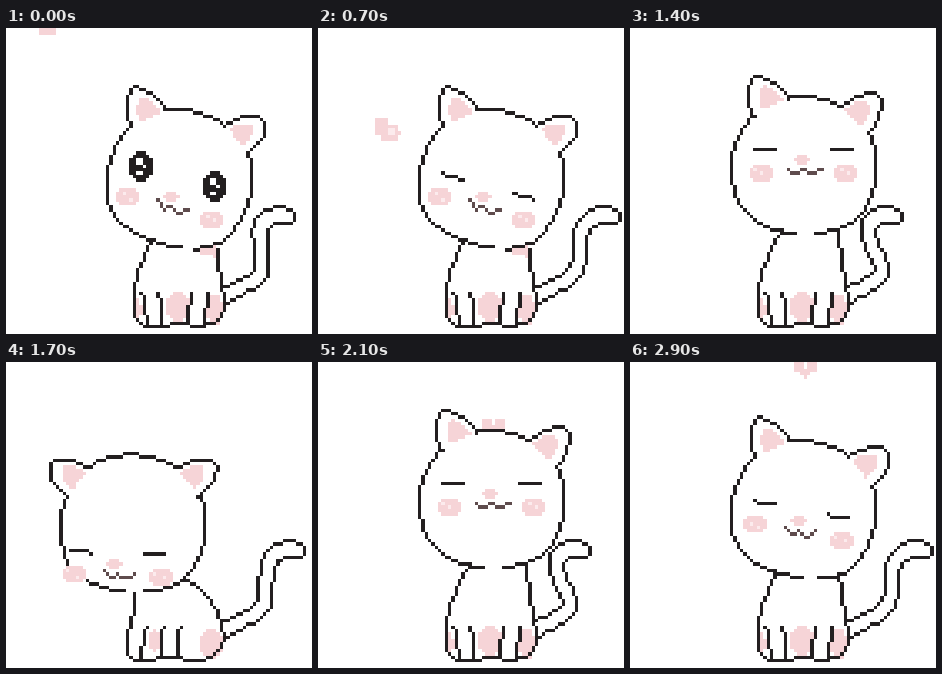
An HTML page with a canvas for the animation above (3000 ms loop, 306 px wide and 306 px high).

```html
<!DOCTYPE html>
<html>
<head>
<meta charset="utf-8">
<style>
html, body { margin: 0; width: 100%; height: 100%; overflow: hidden; background: #fff; }
canvas { display: block; width: 306.667px; height: 306.667px; image-rendering: pixelated; }
</style>
</head>
<body>
<canvas id="stage" width="92" height="92"></canvas>
<script>
const ctx = document.getElementById('stage').getContext('2d');
const INK = '#231f20', PINK = '#f6d4d7', WHITE = '#fff', BROWN = '#5f4c4d', PALE = '#fcebed';
const LOOP = 3000, STEP = 100, TURN = 2 * Math.PI;

// Points are [x, y] in stage units, drawn on a grid of 10/3 unit cells
const cell = v => Math.floor(v * 0.3);
const middle = v => (cell(v) + 0.5) / 0.3;
const range = (n, make) => Array.from({ length: n + 1 }, (_, i) => make(i / n));
const mix = (a, b, k) => a.map((v, i) => v + (b[i] - v) * k);

function dot(x, y, color, w = 1, h = w) {
  ctx.fillStyle = color;
  ctx.fillRect(cell(x), cell(y), w, h);
}

// Smooth curve through points (Catmull-Rom)
function curve(p) {
  return p.slice(1).flatMap((b, i) => {
    const a = p[i], before = p[i - 1] || a, after = p[i + 2] || b;
    return range(10, t => [0, 1].map(n => a[n] + t / 2 * (b[n] - before[n]
      + t * (2 * before[n] - 5 * a[n] + 4 * b[n] - after[n]
      + t * (3 * (a[n] - b[n]) + after[n] - before[n])))));
  });
}

// One cell wide line without doubled corners
function line(p, color = INK) {
  const cells = [];
  p.slice(1).forEach((b, i) => {
    const a = p[i], n = Math.ceil(Math.hypot(b[0] - a[0], b[1] - a[1])) || 1;
    for (const q of range(n, t => mix(a, b, t).map(cell))) {
      const last = cells.at(-1), prior = cells.at(-2);
      if (last && last[0] === q[0] && last[1] === q[1]) continue;
      if (prior && Math.abs(prior[0] - q[0]) === 1 && Math.abs(prior[1] - q[1]) === 1) cells.pop();
      cells.push(q);
    }
  });
  ctx.fillStyle = color;
  for (const [x, y] of cells) ctx.fillRect(x, y, 1, 1);
}

function fill(p, color) {
  ctx.fillStyle = color;
  for (let row = 0; row < 92; row++) {
    const y = (row + 0.5) / 0.3, hits = [];
    p.forEach(([ax, ay], i) => {
      const [bx, by] = p[(i + 1) % p.length];
      if (ay > y !== by > y) hits.push(ax + (y - ay) * (bx - ax) / (by - ay));
    });
    hits.sort((a, b) => a - b);
    for (let k = 0; k + 1 < hits.length; k += 2) {
      const from = Math.round(hits[k] * 0.3);
      ctx.fillRect(from, row, Math.round(hits[k + 1] * 0.3) - from, 1);
    }
  }
}

function oval(x, y, rx, ry, color) {
  fill(range(24, t => [middle(x) + rx * Math.cos(t * TURN), middle(y) + ry * Math.sin(t * TURN)]), color);
}

// Maps local (right, down) to the stage from a centre and a turn in degrees
function frame(x, y, degrees) {
  const c = Math.cos(degrees * TURN / 360), s = Math.sin(degrees * TURN / 360);
  return ([u, v]) => [x + u * c - v * s, y + u * s + v * c];
}

function at(keys, t) {
  const i = Math.max(0, keys.findLastIndex((key, n) => key[0] <= t && n < keys.length - 1));
  const [t0, a] = keys[i], [t1, b] = keys[i + 1];
  return mix(a, b, Math.min(1, (t - t0) / (t1 - t0)));
}

// Head x, y, ear turn, ear spread, then face x, y, turn
const calm = [174, 150, 14, 41, 170, 158, 15];
const level = [174, 137, 9, 38, 173, 121, 0];
const bowed = [127, 161, 0, 53, 112, 191, 2];
const poses = [[0, calm], [700, calm], [1100, [176, 160, 14, 41, 172, 175, 13]],
  [1400, level], [1500, level], [1700, bowed], [1900, bowed], [2100, level],
  [2500, [177, 138, 18, 38, 177, 120, 9]], [2900, [174, 147, 14, 41, 172, 148, 10]]];

// Tail sway: 0 curled in, 1 stretched out
const sways = [[0, [0.6]], [300, [0]], [700, [1]], [1100, [1]], [1400, [0]], [1500, [0]],
  [1600, [0.9]], [1900, [0.9]], [2100, [0]], [2500, [-0.15]], [2700, [0.6]], [2900, [1]]];

function petal(t) {
  const x = 55 - 14 * Math.cos(t / 450 * TURN), y = -5 + 0.138 * t + 2.34e-5 * t * t;
  fill([[x - 12, y - 12], [x + 1, y - 12], [x + 1, y + 2], [x - 12, y + 2]], PINK);
  oval(x + 2, y + 2, 10, 10, PINK);
  dot(x + 5, y, PALE, 2);
}

function heart(y) {
  for (const x of [169, 181]) oval(x, y - 2, 6, 6, PINK);
  fill([[163, y], [187, y], [176, y + 10], [174, y + 10]], PINK);
}

function tail(sway) {
  const tip = 264 + sway * 30;
  const path = curve([[218, 267], [250 + sway * 6, 245], [238 + sway * 26, 203],
    [tip - 16, 188], [tip, 187]]);
  for (const [r, color] of [[7.8, INK], [4.8, WHITE]])
    for (const [x, y] of path) oval(x, y, r, r, color);
}

function body(shape, legs, patches) {
  const edge = curve(shape);
  fill(edge, WHITE);
  for (const [x, y, rx, ry] of patches) oval(x, y, rx, ry, PINK);
  line(edge);
  for (const [x, lean] of legs) line(curve([[x - lean, 264], [x, 280], [x + lean / 2, 296]]));
}

const frontBody = () => body(
  [[150, 205], [134, 240], [127, 270], [131, 292], [148, 298], [172, 296], [200, 297],
    [215, 289], [217, 265], [213, 240], [208, 205]],
  [[139, 3], [155, 3], [183, -3], [200, -3]],
  [[171, 277, 13, 14], [133, 280, 4, 12], [209, 280, 8, 15]]);

const sideBody = () => body(
  [[130, 220], [127, 252], [121, 284], [129, 298], [160, 296], [204, 296],
    [217, 278], [211, 248], [195, 228], [176, 216]],
  [[137, -3], [155, -2], [172, -2]],
  [[147, 278, 6, 12], [204, 281, 12, 14]]);

function ear(place, side) {
  const rim = curve([[-19, -68], [-17, -84], [-8, -98], [1, -102], [7, -97], [15, -84], [18, -67]]);
  const put = p => p.map(([u, v]) => place([u * side, v]));
  fill(put([...rim, [14, -58], [-14, -58]]), WHITE);
  fill(put(rim.map(([u, v]) => [u * 0.62 + 2, v * 0.62 - 26])), PINK);
  line(put(rim));
}

function head([x, y, turn, spread, , , lean]) {
  const power = (v, n) => Math.sign(v) * Math.abs(v) ** (2 / n);
  const place = frame(x, y, lean);
  // Rounder crown, squarer jaw, and a small gap under the chin
  const outline = range(72, t => {
    const a = TURN / 4 + 0.09 - lean * TURN / 360 + t * (TURN - 0.18);
    const c = Math.cos(a), s = Math.sin(a), n = s > 0 ? 2.5 : 2.1;
    return place([72 * power(c, n), 68 * power(s, n)]);
  });
  fill(outline, WHITE);
  line(outline);
  ear(frame(x, y, turn - spread), 1);
  ear(frame(x, y, turn + spread), -1);
}

function openEye(x, y) {
  oval(x, y, 11.5, 15, INK);
  dot(x - 5, y - 8, WHITE, 2);
  dot(x + 3, y, WHITE);
  dot(x - 4, y + 8, WHITE, 2, 1);
}

function face([, , , , x, y, turn], open) {
  const place = frame(x, y, turn);
  for (const side of [-1, 1]) {
    const [cx, cy] = place([43 * side, 23]);
    oval(cx, cy, 12, 8.5, PINK);
    dot(cx - 5, cy - 3, PALE);
    dot(cx + 3, cy + 1, PALE);
    if (open) openEye(...place([38 * side, -10]));
    else line([-10, 10].map(u => place([37 * side + u, 0])));
  }
  oval(...place([-2, 10]), 7, 5, PINK);
  line(range(20, t => place([32 * t - 14, 19 + 6 * Math.abs(Math.sin(t * TURN))])), BROWN);
}

function draw(t) {
  const pose = at(poses, t), [x, y] = pose;
  ctx.fillStyle = WHITE;
  ctx.fillRect(0, 0, 92, 92);
  if (t < 1300) petal(t);
  if (t >= 2000) heart(62 - (t - 2100) * 0.069);
  tail(at(sways, t)[0]);
  if (t >= 1600 && t < 2000) sideBody();
  else frontBody();
  if (t < 1300) fill([[x + 4, y + 62], [x + 36, y + 62], [x + 36, y + 79], [x + 20, y + 75]], PINK);
  head(pose);
  face(pose, t < 500);
}

let shown = -1;
const start = performance.now();
function tick() {
  const t = Math.floor((performance.now() - start) % LOOP / STEP) * STEP;
  if (t !== shown) draw(shown = t);
  requestAnimationFrame(tick);
}
tick();
</script>
</body>
</html>
```
